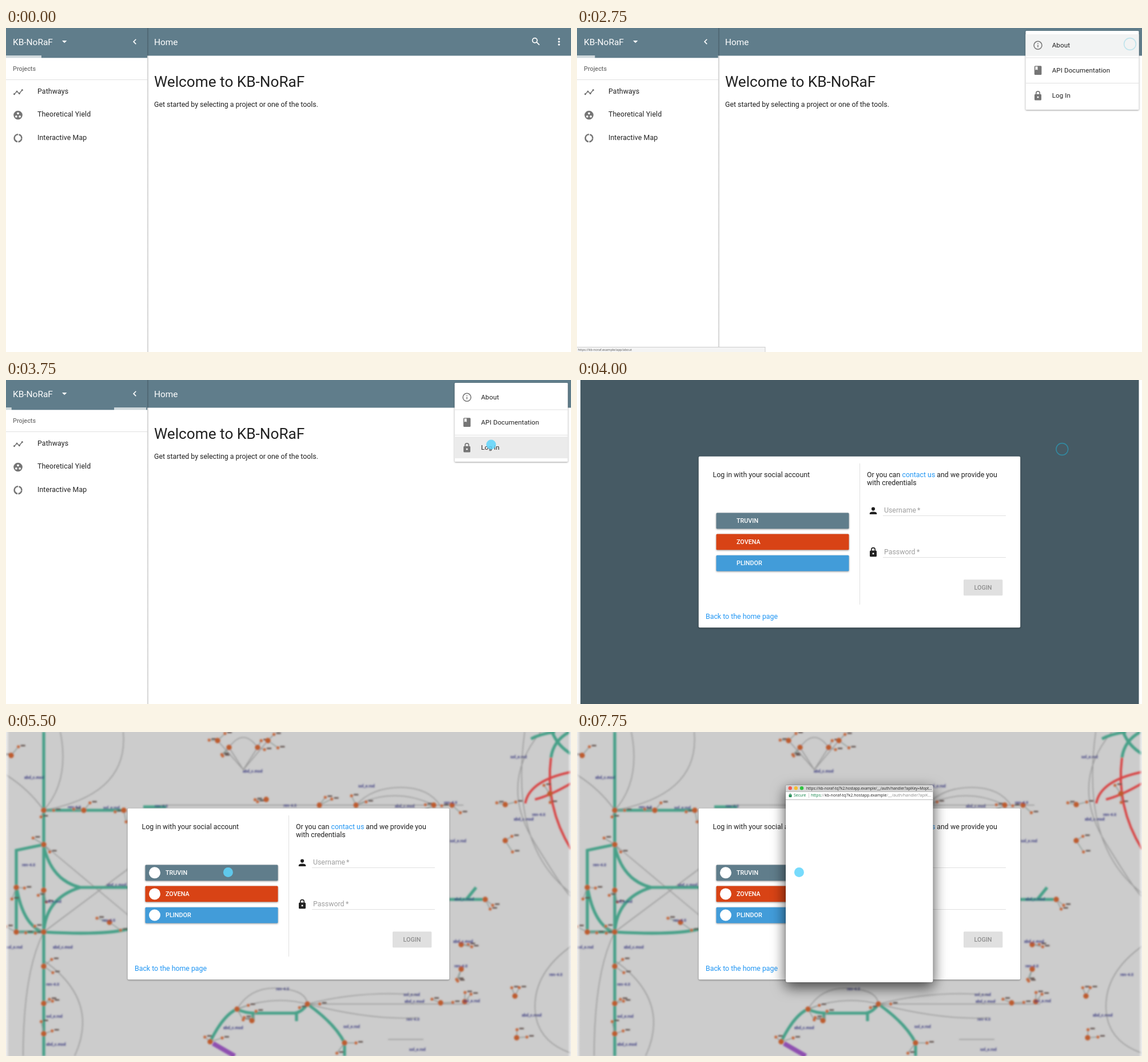
An HTML page that plays this animation: 988x567 px, repeating every 8000 ms.

```html
<!DOCTYPE html>
<html lang="en">
<head>
<meta charset="utf-8">
<title>Login walkthrough</title>
<style>
html, body { margin: 0; width: 100%; height: 100%; overflow: hidden; background: #fff; }
svg { display: block; font: 12.35px Roboto, sans-serif; }
text { fill: #212121; white-space: pre; }
.white { fill: #fff; }
.title { font-size: 15.44px; fill: #fff; }
.list { letter-spacing: .1px; }
.menu { font-size: 11.58px; letter-spacing: .1px; }
.small { font-size: 10.8px; font-weight: 500; }
.link { fill: #2196f3; }
.hint { fill: #9e9e9e; }
.tiny { font: 6.5px "Open Sans", sans-serif; }
.label { font: bold 7px Roboto, sans-serif; fill: #36367d; }
.line { fill: none; stroke: #e0e0e0; }
.grey { fill: #757575; }
.stroke { fill: none; stroke: #757575; stroke-width: 1.5; }
.raised { filter: drop-shadow(0 1px 1.5px rgba(0,0,0,.4)); }
.floating { filter: drop-shadow(0 8px 12px rgba(0,0,0,.55)) drop-shadow(0 0 1px rgba(0,0,0,.4)); }
.progress { fill: #607d8b; transform-box: fill-box; transform-origin: center; }
</style>
</head>
<body>
<svg width="988" height="567" viewBox="0 0 988 567">
  <defs>
    <filter id="soft" x="0" y="0" width="988" height="567" filterUnits="userSpaceOnUse"><feGaussianBlur stdDeviation="1.7"/></filter>
    <clipPath id="track"><rect y="48" width="247" height="4.5"/></clipPath>
    <linearGradient id="edge"><stop stop-color="#fff" stop-opacity=".7"/><stop offset=".006" stop-color="#fff" stop-opacity="0"/><stop offset=".994" stop-color="#fff" stop-opacity="0"/><stop offset="1" stop-color="#fff" stop-opacity=".7"/></linearGradient>
    <linearGradient id="side"><stop stop-opacity=".22"/><stop offset="1" stop-opacity="0"/></linearGradient>
    <g id="lock">
      <rect x="-6" y="-2.6" width="12" height="10.8" rx="1.5"/>
      <path d="M-3.2-2V-4.2a3.2 3.2 0 0 1 6.4 0V-2" fill="none" stroke="currentColor" stroke-width="1.6"/>
      <circle cy="2.8" r="1.5" fill="#fff"/>
    </g>
  </defs>

  <g id="home">
    <rect width="988" height="567" fill="#fff"/>
    <rect width="988" height="48.5" fill="#607d8b"/>
    <rect x="247" width="3" height="567" fill="url(#side)"/>
    <g clip-path="url(#track)">
      <rect y="48" width="247" height="4.5" fill="#cfd8dc"/>
      <rect id="bar1" class="progress" y="48" width="247" height="4.5"/>
      <rect id="bar2" class="progress" y="48" width="247" height="4.5"/>
    </g>
    <text class="title" x="12" y="29.5">KB-NoRaF</text>
    <path class="white" d="M98 22h8.4l-4.2 4.2z"/>
    <path d="M227.3 19.7l-4.2 4.2 4.2 4.2" fill="none" stroke="#fff" stroke-width="1.6"/>
    <text class="title" x="259" y="29.5">Home</text>
    <g fill="none" stroke="#fff" stroke-width="1.7"><circle cx="924.7" cy="21.7" r="4.1"/><path d="M927.7 24.7l5 5"/></g>
    <g class="white"><circle cx="967" cy="19" r="1.7"/><circle cx="967" cy="24" r="1.7"/><circle cx="967" cy="29" r="1.7"/></g>

    <text class="small" x="12" y="75" style="fill:#757575">Projects</text>
    <path class="line" d="M0 90.5H247"/>
    <path class="stroke" d="M14.5 115.7L19 111l4.3 3.6 5-6"/>
    <g class="grey"><circle cx="14.5" cy="115.7" r="1.6"/><circle cx="19" cy="111" r="1.6"/><circle cx="23.3" cy="114.6" r="1.6"/><circle cx="28.3" cy="108.6" r="1.6"/></g>
    <circle class="grey" cx="21" cy="152.5" r="7.8"/>
    <g class="white"><circle cx="17.9" cy="154.8" r="1.9"/><circle cx="21" cy="149.4" r="1.9"/><circle cx="24.1" cy="154.8" r="1.9"/></g>
    <circle class="stroke" cx="21" cy="192.7" r="6.4" style="stroke-width:2.6" stroke-dasharray="8.5 1.5 18.7 1.5 8.5 1.5" transform="rotate(6.7 21 192.7)"/>
    <g class="list">
      <text x="55" y="115.3">Pathways</text>
      <text x="55" y="155.4">Theoretical Yield</text>
      <text x="55" y="195.5">Interactive Map</text>
    </g>
    <text x="259" y="102.6" font-size="26.2">Welcome to KB-NoRaF</text>
    <text x="259" y="138.2">Get started by selecting a project or one of the tools.</text>

    <g id="menu">
      <rect class="raised white" x="784.5" y="5" width="198" height="138" rx="1.5"/>
      <rect id="hover" x="784.5" width="198" height="38"/>
      <path class="line" d="M785 52H982M785 96.5H982"/>
      <circle class="stroke" cx="806" cy="30.3" r="7"/>
      <path class="stroke" d="M806 29.5v4.3M806 26.5v1.6"/>
      <rect class="grey" x="799.8" y="66.3" width="12.6" height="15.6" rx="1.5"/>
      <path class="white" d="M801.5 67.5h4v6.3l-2-1.3-2 1.3z"/>
      <use href="#lock" x="806" y="118.3" fill="#757575" color="#757575"/>
      <g class="menu">
        <text x="830.7" y="33.8">About</text>
        <text x="830.7" y="77.5">API Documentation</text>
        <text x="830.7" y="122.2">Log In</text>
      </g>
    </g>
    <g id="status">
      <rect x="-1" y="558.5" width="330" height="9" fill="#f4f4f4" stroke="#ccc"/>
      <text class="tiny" x="1.5" y="565" style="font-size:5.6px;fill:#555">https://kb-noraf.example/app/about</text>
    </g>
  </g>

  <g id="login">
    <rect width="988" height="567" fill="#fff"/>
    <rect id="slate" x="6" width="976.5" height="567" fill="#465a64"/>
    <g id="map">
      <rect width="988" height="567" fill="#ccc"/>
      <g filter="url(#soft)" fill="none" id="network"></g>
      <rect width="988" height="567" fill="url(#edge)"/>
    </g>
    <rect class="raised white" x="212.7" y="133.7" width="562.5" height="299.5" rx="2"/>
    <path class="line" d="M494.5 146V393M535 237.5H750M535 310.5H750"/>
    <text x="237.5" y="169.7">Log in with your social account</text>
    <text x="507" y="169.7">Or you can <tspan class="link">contact us</tspan> and we provide you<tspan x="507" y="184.3">with credentials</tspan></text>
    <g id="buttons"></g>
    <circle cx="518" cy="225.6" r="3.1" fill="#212121"/>
    <path d="M511.8 235v-1.6q0-3 6.2-3t6.2 3v1.6z" fill="#212121"/>
    <use href="#lock" x="518" y="301" fill="#212121" color="#212121"/>
    <text class="hint" x="537" y="232.2">Username<tspan x="595">*</tspan></text>
    <text class="hint" x="537" y="304.8">Password<tspan x="594">*</tspan></text>
    <rect x="676" y="349.3" width="68.3" height="28" rx="1.5" fill="#e0e0e0"/>
    <text class="small" x="694.5" y="367.2" style="fill:#8f8f8f">LOGIN</text>
    <text class="link" x="225" y="418.2">Back to the home page</text>

    <g id="popup">
      <rect class="floating white" x="365" y="93" width="257.5" height="345" rx="3"/>
      <path d="M365 104.5V96q0-3 3-3h251.5q3 0 3 3v8.5z" fill="#d5d5d5"/>
      <path class="line" d="M365 104.5H622.5M365 118.5H622.5" style="stroke:#bbb"/>
      <circle cx="372.7" cy="98.3" r="3.2" fill="#f25a52"/><circle cx="382.8" cy="98.3" r="3.2" fill="#f6bd2f"/><circle cx="393" cy="98.3" r="3.2" fill="#2fc440"/>
      <g id="blank">
        <text class="tiny" x="493.7" y="100.6" text-anchor="middle">about:blank</text>
        <circle class="stroke" cx="373" cy="111" r="3" style="stroke-width:.8"/>
        <path class="stroke" d="M373 110.5v2.2M373 109v.8" style="stroke-width:.8"/>
        <text class="tiny" x="379.5" y="113.3" style="font-size:6.8px"><tspan fill="#888">about:</tspan><tspan font-weight="600">blank</tspan></text>
      </g>
      <g id="loaded">
        <text class="tiny" x="401" y="100.6">https://kb-noraf-tq7k2.hostapp.example/__/auth/handler?apiKey=Mopt...</text>
        <use href="#lock" transform="translate(373 110.6) scale(.4)" fill="#0b8043" color="#0b8043"/>
        <text class="tiny" x="379" y="113.3" style="font-size:6.8px;fill:#0b8043">Secure</text>
        <path class="line" d="M405.5 107V115" style="stroke:#ccc"/>
        <text class="tiny" x="409" y="113.3" style="font-size:7.1px"><tspan fill="#0b8043">https:</tspan><tspan fill="#888">//</tspan><tspan font-weight="500">kb-noraf-tq7k2.hostapp.example</tspan><tspan fill="#888">/__/auth/handler?apiK...</tspan></text>
      </g>
    </g>
  </g>
  <circle id="dot" r="8.5" fill="#5fd5fc" opacity=".85"/>
  <circle id="ring" r="10.4" fill="none" stroke="#1fb5da" stroke-width="1.6"/>
</svg>
<script>
const LOOP = 8000, STEP = 250;
const $ = id => document.getElementById(id);
const show = (id, on) => $(id).style.display = on ? '' : 'none';

// Social buttons
$('buttons').innerHTML = [['TRUVIN', '#607d8b'], ['ZOVENA', '#d84315'], ['PLINDOR', '#429cd9']].map(([name, color], i) => {
  const y = 232.5 + i * 37.1;
  return `<rect class="raised" id="button${i}" x="243.5" y="${y}" width="232" height="27.7" rx="1.5" fill="${color}"/>
    <circle class="white badge" cx="260" cy="${y + 13.8}" r="10"/>
    <text class="small" x="279" y="${y + 17.7}" style="fill:#fff">${name}</text>`;
}).join('');

// Blurred pathway map
function drawNetwork() {
  let seed = 11;
  const random = () => (seed = seed * 16807 % 2147483647) / 2147483647;
  const pathways = [
    ['#999', 1.6, `M95 0Q112 85 66 137M0 75Q40 100 66 137M66 137Q215 110 205 0M66 350L213 240M66 197L213 320
      M370 15L415 66 458 15M390 27Q415-8 440 27M390 27L415 66 440 27M270 128H800M612 128Q640 97 690 97T760 130
      M612 128Q680 95 748 128M935 0Q860 90 925 195T988 285M907 0Q880 200 988 282M404 485Q430 440 490 450 525 455 527 476`],
    ['#999', 1.6, `M404 485Q465 460 527 476H810M527 476Q620 452 720 460M527 476Q640 505 720 500
      M30 567Q30 420 66 350M120 567Q165 470 66 400M988 375Q925 420 925 480T988 562M668 538H730`],
    ['#46a088', 5.2, `M66 0V567M66 137H206M66 197L18 207V350H66M18 270Q30 340 66 350M66 200Q80 260 130 272H213
      M66 350Q70 290 130 272M66 350Q170 356 213 345M240 131H280M404 485Q418 492 435 492H505Q518 490 527 476
      M404 485Q380 495 357 542M527 476Q575 510 592 544V567M775 293H838M805 293L822 272M432 492V505M508 492V506
      M918 12Q935 3 960 0M953 45Q957 15 985 0M955 0Q965 25 988 38`],
    ['#d84545', 4, 'M953 45Q942 130 988 205M908 125Q915 85 988 70M925 118Q950 112 988 90'],
    ['#8e4fb0', 8, 'M362 545L400 567']
  ];
  const nodes = [[66,137],[136,137],[206,137],[66,197],[66,277],[66,350],[18,272],[18,350],[66,410],[66,475],
    [66,528],[404,485],[527,476],[357,542],[592,544],[612,128],[548,128],[748,128],[440,27],[390,27],[838,293],
    [181,333],[760,474],[9,41],[873,127],[873,190],[890,462],[370,15],[458,15],[802,472],[796,372],[796,415],
    [893,535],[951,108],[455,118],[780,128],[430,505]];
  const labels = [[32,80],[28,233],[68,297],[176,268],[168,330],[0,377],[82,377],[70,442],[70,498],[70,547],[108,132],
    [170,133],[414,69],[485,129],[616,95],[680,130],[766,124],[882,44],[888,153],[920,145],[695,460],[697,472],
    [700,503],[590,516],[380,518],[472,450],[776,191],[782,367],[784,410],[800,471],[902,496],[950,425],[705,556],[784,293],[260,130]];
  const twig = ([x, y]) => Array.from({ length: 2 }, () => {
    const angle = random() * 6.28, length = 12 + random() * 12;
    const tx = x + length * Math.cos(angle), ty = y + length * Math.sin(angle);
    return `<path d="M${x} ${y}L${tx} ${ty}" stroke="#8f9a95" stroke-width="1.5"/>
      <circle cx="${tx}" cy="${ty}" r="2.6" fill="#c4683c"/>
      <path d="M${tx + 4} ${ty - 2}h8" stroke="#5a4a44" stroke-width="2.4"/>`;
  }).join('');
  $('network').innerHTML =
    pathways.map(([color, width, d]) => `<path d="${d}" stroke="${color}" stroke-width="${width}"/>`).join('') +
    nodes.map(twig).join('') +
    nodes.map(([x, y]) => `<circle cx="${x}" cy="${y}" r="4.7" fill="#bd5b2e"/>`).join('') +
    labels.map(([x, y], i) => `<text class="label" x="${x}" y="${y + 2}">${['abd_c.mod', 'ren-4.0', 'sol_e.rod'][i % 3]}</text>`).join('');
}
drawNetwork();

// Indeterminate progress: each stop is [offset, value, easing to the next stop]
const animations = [];
function animate(id, property, format, stops) {
  const frames = stops.map(([offset, value, curve]) =>
    ({ offset, [property]: format(value), easing: curve ? `cubic-bezier(${curve})` : 'linear' }));
  const animation = $(id).animate(frames, { duration: 4000, iterations: Infinity });
  animation.pause();
  animations.push(animation);
}
const shift = percent => `${percent * 2.47}px`;
const stretch = factor => `${factor} 1`;
animate('bar1', 'translate', shift, [[0, -105.17], [.2, -105.17, '.5,0,.7,.5'], [.595, -21.5, '.3,.38,.55,.956'], [1, 95.44]]);
animate('bar1', 'scale', stretch, [[0, .1], [.366, .1, '.335,.125,.786,1'], [.6915, .83, '.226,0,.234,1.371'], [1, .1]]);
animate('bar2', 'translate', shift, [[0, -54.89, '.15,0,.515,.41'], [.25, -17.25, '.31,.284,.8,.734'], [.4835, 29.5, '.4,.627,.6,.902'], [1, 117.39]]);
animate('bar2', 'scale', stretch, [[0, .1, '.205,.057,.577,.454'], [.1915, .57, '.152,.196,.648,1'], [.4415, .91, '.258,0,.212,1.382'], [1, .1]]);

// Pointer path: [time, x, y]
const pointer = [[0, 1010, 9], [500, 1000, 12], [1250, 967, 20], [2750, 967, 20], [3500, 851, 110], [3750, 848.3, 113],
  [4250, 848.3, 113], [5000, 397, 248], [5500, 388.4, 245.4], [LOOP, 388.4, 245.4]];
const clicks = [2500, 4000, 6000];

function pointerAt(t) {
  const i = pointer.findIndex(key => key[0] > t);
  const [t0, x0, y0] = pointer[i - 1], [t1, x1, y1] = pointer[i];
  const k = (t - t0) / (t1 - t0);
  return [x0 + (x1 - x0) * k, y0 + (y1 - y0) * k];
}

function render(t) {
  for (const animation of animations) animation.currentTime = .688 * 4000 + t;
  const [x, y] = pointerAt(t);
  const click = clicks.find(start => t >= start && t < start + 2 * STEP);
  show('dot', click === undefined);
  show('ring', click !== undefined);
  $('dot').setAttribute('transform', `translate(${x} ${y})`);
  $('ring').setAttribute('transform', `translate(${x} ${y + 8})`);
  $('ring').setAttribute('opacity', t === click ? .5 : .23);

  show('home', t < 4000);
  show('menu', t >= 2500);
  show('hover', t >= 2750);
  $('hover').setAttribute('y', y < 50 ? 11 : y < 94 ? 55 : 99);
  $('hover').setAttribute('fill', t < 3000 ? '#f2f3f3' : '#ebebeb');
  show('status', t >= 2750 && t < 3500);

  show('login', t >= 4000);
  show('map', t >= 4250);
  for (const badge of document.querySelectorAll('.badge')) badge.style.display = t >= 4250 ? '' : 'none';
  $('button0').setAttribute('fill', t >= 6000 && t < 6750 ? '#667a85' : '#607d8b');
  show('popup', t >= 6250);
  show('blank', t < 7250);
  show('loaded', t >= 7250);
}

let start;
function frame(now) {
  start ??= now;
  render(Math.floor((now - start) % LOOP / STEP) * STEP);
  requestAnimationFrame(frame);
}
render(0);
requestAnimationFrame(frame);
</script>
</body>
</html>
```
